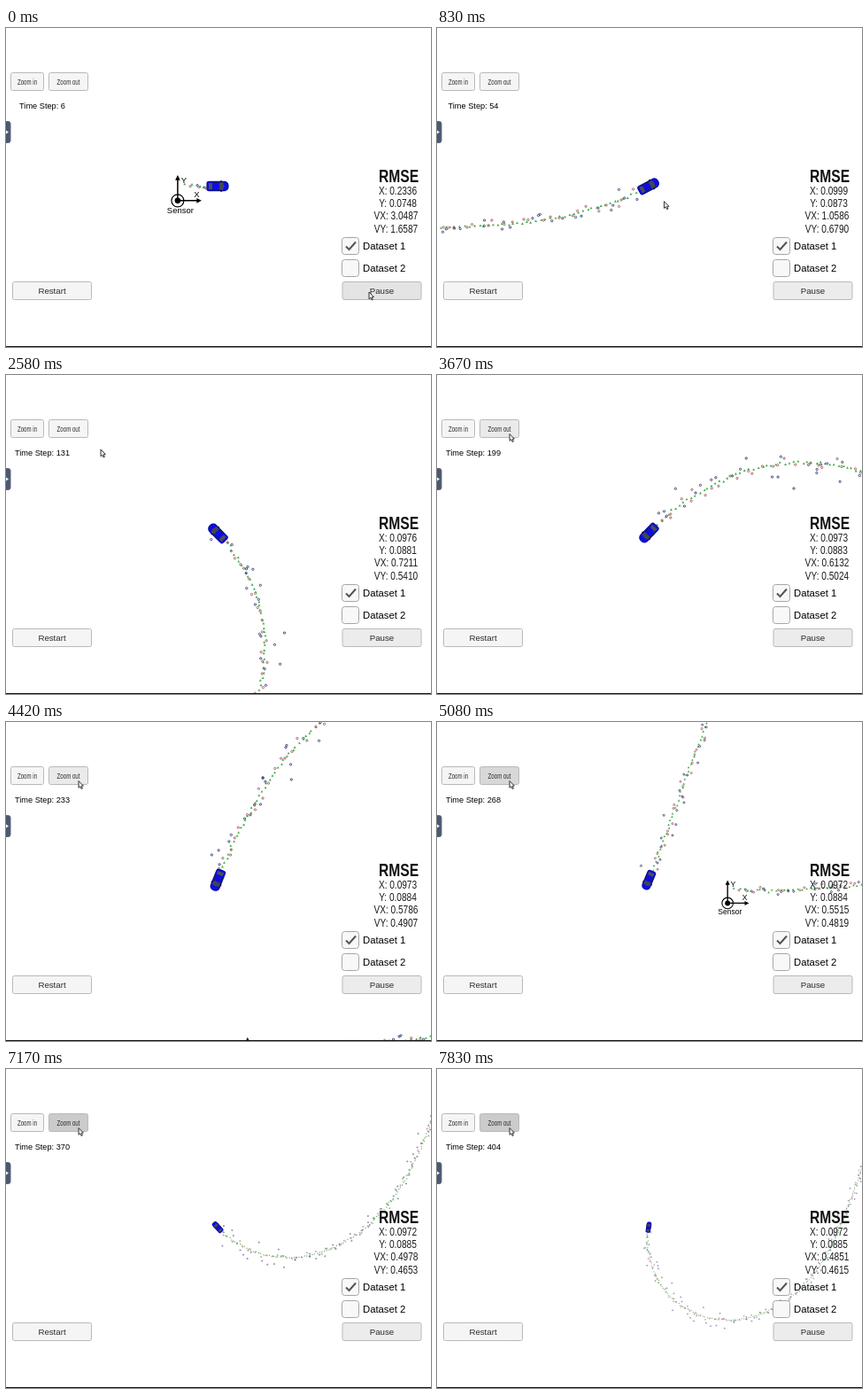
Animation, 480 px wide and 360 px high, one loop 8000 ms. Source, as an HTML page with a canvas:

```html
<!DOCTYPE html>
<html lang="en">
<head>
<meta charset="utf-8">
<title>Kalman filter tracking</title>
<style>
html, body { margin: 0; width: 100%; height: 100%; overflow: hidden; background: #fff; }
canvas { display: block; width: 480px; height: 360px; }
</style>
</head>
<body>
<canvas id="stage"></canvas>
<script>
const W = 480, H = 360, LOOP = 8000, TICK = LOOP / 96;
const FONT = '"Liberation Sans", Arial, sans-serif';
const CAR = { x: 239, y: 178.5 };

const canvas = document.getElementById('stage');
const ctx = canvas.getContext('2d');
const dpr = window.devicePixelRatio || 1;
canvas.width = W * dpr;
canvas.height = H * dpr;

// Ticks on which the simulator does not redraw.
const stalls = [11, 29, 30, 34, 52, 76, 95];
// Redraw count, time step reached.
const pace = [[0, 6], [10, 54], [28, 131], [40, 199], [56, 268.7], [88, 404]];

const mix = (a, b, f) => a + (b - a) * f;
const glide = (t, from, to) => Math.min(1, Math.max(0, (t - from) / (to - from)));

function stepAt(redraw) {
  let i = 0;
  while (i < pace.length - 2 && pace[i + 1][0] <= redraw) i++;
  const [from, a] = pace[i], [to, b] = pace[i + 1];
  return mix(a, b, glide(redraw, from, to));
}

// Pixels per metre: the view shrinks quadratically once zooming out begins.
const zoomAt = t => (4.57 - 0.421 * Math.max(0, t / 1000 - 4.52)) ** 2;

function pointerAt(t) {
  const leave = glide(t, 0, 830), cross = glide(t, 830, 2000), settle = glide(t, 2750, 3250);
  return {
    x: 410 - 153 * leave - 150 * cross - 25 * settle,
    y: 298 - 102 * leave - 112 * cross - 17.5 * settle
  };
}

// An error falls from its first value towards a floor as steps accumulate.
const rmse = (n, first, floor, power) =>
  Math.sqrt(floor ** 2 + (first ** 2 - floor ** 2) * (6 / n) ** power).toFixed(4);

// Figure-eight drive: sinusoidal yaw rate, slightly varying speed.
const yaw = n => 0.55 * 12.5 / Math.PI * (1 - Math.cos(n * Math.PI / 250));
const speed = n => 5 + 0.2 * Math.cos(n * Math.PI / 125);
const path = [{ x: 0.6, y: 0.6 }];
for (let n = 0; n < 420; n++) {
  const p = path[n], d = 0.05 * speed(n + 0.5), h = yaw(n + 0.5);
  path.push({ x: p.x + d * Math.cos(h), y: p.y + d * Math.sin(h) });
}

function place(n) {
  const i = Math.floor(n), a = path[i], b = path[i + 1];
  return { x: mix(a.x, b.x, n - i), y: mix(a.y, b.y, n - i) };
}

let seed = 20;
function random() {
  seed = (seed * 16807) % 2147483647;
  return seed / 2147483647;
}
const gauss = () => (random() + random() + random() + random() - 2) * 1.73;
const jitter = (p, d) => ({ x: p.x + gauss() * d, y: p.y + gauss() * d });

// Lidar and radar readings alternate; each step also has an estimate.
const marks = path.map((p, i) => {
  const guess = jitter(p, i < 8 ? 0.12 : 0.04);
  if (i % 2 === 0) return { guess, color: '#a8525e', ...jitter(p, 0.14) };
  const range = Math.hypot(p.x, p.y) + gauss() * 0.3;
  const angle = Math.atan2(p.y, p.x) + gauss() * 0.03;
  return { guess, color: '#34366f', x: range * Math.cos(angle), y: range * Math.sin(angle) };
});

function text(str, x, y, size, { align = 'center', narrow = 1, weight = '', color = '#000' } = {}) {
  ctx.save();
  ctx.translate(x, y);
  ctx.scale(narrow, 1);
  ctx.font = `${weight} ${size}px ${FONT}`;
  ctx.textAlign = align;
  ctx.fillStyle = color;
  ctx.fillText(str, 0, 0);
  ctx.restore();
}

function box(x, y, w, h, r, fill, stroke) {
  ctx.beginPath();
  ctx.roundRect(x, y, w, h, r);
  ctx.fillStyle = fill;
  ctx.fill();
  if (stroke) {
    ctx.strokeStyle = stroke;
    ctx.lineWidth = 1;
    ctx.stroke();
  }
}

function trace(points) {
  ctx.beginPath();
  points.forEach(p => ctx.lineTo(p[0], p[1]));
}

function shape(points, fill) {
  trace(points);
  ctx.closePath();
  ctx.fillStyle = fill;
  ctx.fill();
}

function disc(x, y, r) {
  ctx.beginPath();
  ctx.arc(x, y, r, 0, 7);
}

function button(label, x, y, w, h, tone, narrow = 1) {
  box(x + 0.5, y + 0.5, w - 1, h - 1, 2, `rgb(${tone},${tone},${tone})`, '#b9b9b9');
  text(label, x + w / 2, y + h / 2 + 3.3, 9.7, { narrow, color: '#2c2c2c' });
}

function checkbox(label, y, checked) {
  box(379.5, y + 0.5, 19, 19, 3, '#f8f8f8', '#a6a6a6');
  if (checked) {
    trace([[384, y + 10.5], [387.5, y + 14], [395, y + 5.5]]);
    ctx.strokeStyle = '#555';
    ctx.lineWidth = 2;
    ctx.stroke();
  }
  text(label, 403, y + 13.7, 11.3, { align: 'left' });
}

function drawSensor(x, y, k) {
  ctx.save();
  ctx.translate(x, y);
  ctx.scale(k, k);
  ctx.strokeStyle = '#000';
  ctx.lineWidth = 1.5;
  trace([[0, -24], [0, 0], [23, 0]]);
  ctx.stroke();
  shape([[0, -29], [-2.8, -23], [2.8, -23]], '#000');
  shape([[27, 0], [21.5, -2.8], [21.5, 2.8]], '#000');
  disc(0, 0, 7);
  ctx.lineWidth = 1.2;
  ctx.stroke();
  disc(0, 0, 3.3);
  ctx.fill();
  text('Y', 7, -20, 9.5);
  text('X', 21.5, -3.5, 9.5);
  text('Sensor', 3, 14.5, 9.5);
  ctx.restore();
}

function drawMarks(count, screen, s) {
  const r = s * 0.055, g = s * 0.068;
  ctx.lineWidth = s * 0.042;
  marks.slice(0, count).forEach(m => {
    const p = screen(m), q = screen(m.guess);
    disc(p.x, p.y, r);
    ctx.strokeStyle = m.color;
    ctx.stroke();
    shape([[q.x, q.y - g], [q.x - g, q.y + g * 0.8], [q.x + g, q.y + g * 0.8]], '#3cab43');
  });
}

function drawCar(heading, k) {
  ctx.save();
  ctx.translate(CAR.x, CAR.y);
  ctx.rotate(-heading);
  ctx.scale(k, k);
  box(-12.6, -5.7, 25.2, 11.4, [3, 5, 5, 3], '#0606a0');
  box(-11.8, -4.8, 23.6, 9.6, [2.5, 4.5, 4.5, 2.5], '#0c0ee0');
  shape([[-10, -4], [-6, -3.2], [-6, 3.2], [-10, 4]], '#4c4e58');
  shape([[1.6, -3.6], [6, -4.7], [7.4, 0], [6, 4.7], [1.6, 3.6], [2.2, 0]], '#444650');
  for (const side of [-1, 1]) {
    shape([[-5.5, 5 * side], [4.2, 5 * side], [1.6, 3.7 * side], [-5, 3.7 * side]], '#1c1e4c');
    ctx.fillStyle = '#080840';
    ctx.fillRect(3.2, 5.5 * side - 0.7, 1.8, 1.4);
  }
  ctx.restore();
}

function drawCursor({ x, y }) {
  ctx.save();
  ctx.translate(x, y);
  trace([[0, 0], [0, 7.8], [1.8, 6.2], [3.1, 9], [4.4, 8.4], [3.2, 5.7], [5.4, 5.6]]);
  ctx.closePath();
  ctx.fillStyle = '#f4f4f4';
  ctx.strokeStyle = '#333';
  ctx.lineWidth = 1;
  ctx.fill();
  ctx.stroke();
  ctx.restore();
}

function drawPanel(t, n) {
  // Zoom out: hovered, then held down.
  const zoomTone = Math.round(245 - 11 * glide(t, 3150, 3250) - 31 * glide(t, 4400, 5600));
  button('Zoom in', 5, 50, 38, 21, 245, 0.63);
  button('Zoom out', 48, 50, 45, 21, zoomTone, 0.63);
  button('Restart', 7, 286, 90, 21, 245);
  button('Pause', 379.5, 286, 90, 21, t < 250 ? 228 : 236);
  text(`Time Step: ${Math.floor(n + 1e-6)}`, 41, 91.3, 9.8, { narrow: 0.94 });

  box(-4, 105.5, 9, 24, 2.5, '#4b5870', '#5d687c');
  shape([[0, 115.5], [3, 117.5], [0, 119.5]], '#fff');

  text('RMSE', 443.5, 173.5, 20.8, { narrow: 0.75, weight: 'bold', color: '#111' });
  [
    `X: ${rmse(n, 0.2336, 0.0971, 2)}`,
    `Y: ${rmse(n, 0.0748, 0.0887, 1)}`,
    `VX: ${rmse(n, 3.0487, 0.3143, 1)}`,
    `VY: ${rmse(n, 1.6587, 0.418, 1)}`
  ].forEach((line, i) => {
    text(line, i < 2 ? 442.5 : 440.5, 187.7 + i * 14.3, 12.3, { narrow: 0.82, color: '#1c1c1c' });
  });
  checkbox('Dataset 1', 236, true);
  checkbox('Dataset 2', 261, false);
  ctx.fillStyle = '#111';
  ctx.fillRect(0, 359, W, 1);
}

function draw(time) {
  let tick = Math.floor((time + 4) / TICK) % 96;
  while (stalls.includes(tick)) tick--;
  const t = tick * TICK;
  const n = stepAt(tick - stalls.filter(k => k < tick).length);

  const s = zoomAt(t), k = s / 20.9;
  const here = place(n);
  const screen = p => ({ x: CAR.x + (p.x - here.x) * s, y: CAR.y - (p.y - here.y) * s });

  ctx.setTransform(dpr, 0, 0, dpr, 0, 0);
  ctx.fillStyle = '#fff';
  ctx.fillRect(0, 0, W, H);
  const origin = screen({ x: 0, y: -0.18 });
  drawMarks(Math.floor(n), screen, s);
  drawSensor(origin.x, origin.y, k);
  drawCar(yaw(n), k);
  drawPanel(t, n);
  drawCursor(pointerAt(t));
}

const start = performance.now();
function loop() {
  draw((performance.now() - start) % LOOP);
  requestAnimationFrame(loop);
}
loop();
</script>
</body>
</html>
```
